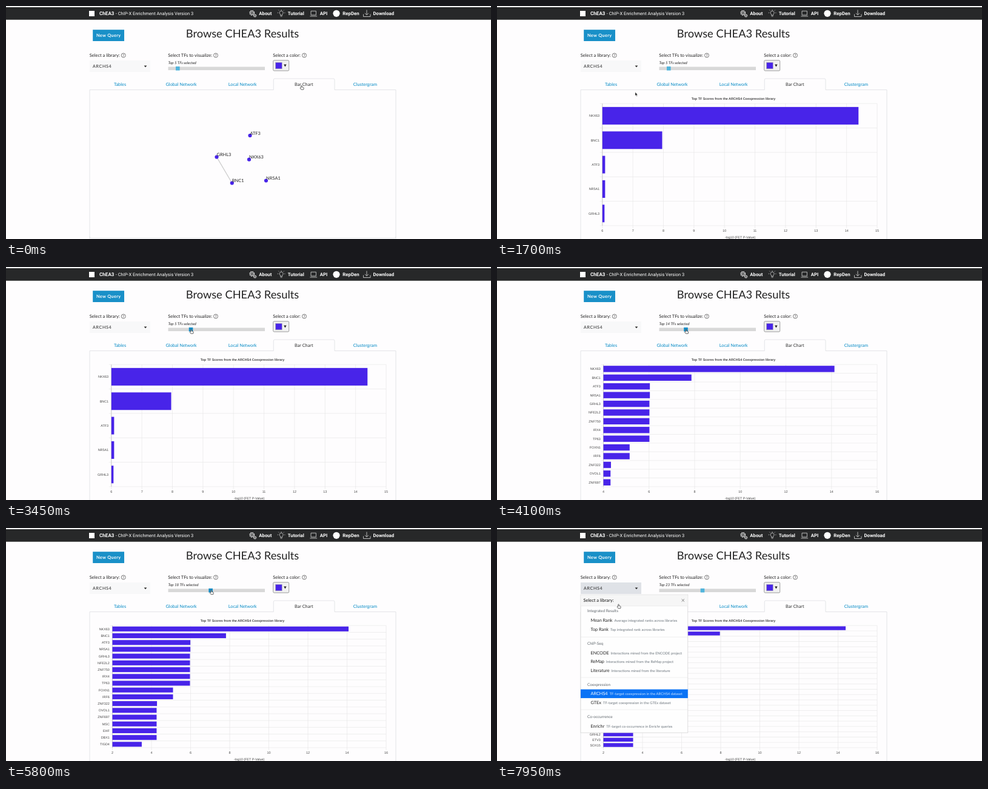
An HTML page for the animation above (8000 ms loop, 800 px wide and 385 px high).

```html
<!DOCTYPE html>
<html lang="en">
<head>
<meta charset="utf-8">
<title>Browse Results</title>
<style>
  html, body { margin: 0; width: 100%; height: 100%; overflow: hidden; background: #fefdfe; }
  svg { display: block; width: 800px; height: 385px; font-family: Lato, sans-serif; fill: #222; text-rendering: geometricPrecision; }
  .nav { font: 7.45px Roboto, sans-serif; fill: #fff; }
  .nav .b { font-weight: 700; font-size: 7.8px; }
  .icon { fill: none; stroke: #ddd; stroke-width: .8; }
  .label { font-size: 7.45px; }
  .tab { font-size: 7.35px; font-weight: 500; text-anchor: middle; fill: #1592c9; }
  .tab.on { font-weight: 400; fill: #333; }
  .chart { font: 5.4px "Liberation Sans", Arial, sans-serif; fill: #444; }
  .grid { stroke: #e5e5e5; stroke-width: .6; fill: none; }
  .bars { fill: #4824e9; }
  .mid { text-anchor: middle; }
  .end { text-anchor: end; }
  .frame { fill: none; stroke: #dedfe2; stroke-width: .8; }
  .group { font-size: 6.45px; fill: #5f666c; }
  .item { font-size: 7.3px; }
  .note { font-size: 5.9px; fill: #6c757d; }
  .chosen, .chosen .note { fill: #fff; }
  .chosen .note { fill: #cfe4ff; }
</style>
</head>
<body>
<svg viewBox="0 0 800 385">
  <rect width="800" height="385" fill="#fefdfe"/>
  <rect y="2" width="800" height="20.7" fill="#272829"/>
  <g class="nav">
    <rect x="137" y="8" width="9" height="9"/>
    <text x="154" y="15" class="b" style="font-size:8.1px">ChEA3</text>
    <text x="180.8" y="15">- ChIP-X Enrichment Analysis Version 3</text>
    <text x="417.3" y="15" class="b">About</text>
    <text x="464.8" y="15" class="b">Tutorial</text>
    <text x="517.7" y="15" class="b">API</text>
    <text x="555.3" y="15" class="b">RepDen</text>
    <text x="605.5" y="15" class="b">Download</text>
    <circle cx="545" cy="12.3" r="5.6"/>
  </g>
  <g class="icon">
    <circle cx="405.8" cy="11.3" r="3.6" stroke-width="1.7" stroke-dasharray="1.7 1.13"/>
    <circle cx="405.8" cy="11.3" r="2.9"/><circle cx="405.8" cy="11.3" r="1.2"/>
    <circle cx="410.6" cy="15.9" r="2.1" stroke-width="1.3" stroke-dasharray="1 .65"/>
    <circle cx="410.6" cy="15.9" r="1.4"/>
    <path d="M452.5 15.3v-1.6a3 3 0 1 1 3.2 0v1.6zM452.6 17h3M454.1 6v1.4M449 11.2h-1.2M459.2 11.2h1.2M450.4 7.6l-.9-.9M457.8 7.6l.9-.9"/>
    <path d="M503 8.3h8.4v6.6H503zM501.4 16.9h11.7"/>
    <path d="M595 6.5v8M592 11.8l3 3 3-3M589.5 13.5v4h11.5v-4"/>
  </g>

  <rect x="143.2" y="39.2" width="51.8" height="18.8" fill="#1990c8"/>
  <text x="169.2" y="51.2" class="mid" style="font-size:7.3px;font-weight:700;letter-spacing:.35px;fill:#fff">New Query</text>
  <text x="390" y="52.3" class="mid" style="font-size:18.3px">Browse CHEA3 Results</text>

  <g class="label">
    <text x="137.8" y="84.3">Select a library:</text>
    <text x="267.3" y="84.3">Select TFs to visualize:</text>
    <text x="440.3" y="84.3">Select a color:</text>
  </g>
  <g id="help"></g>

  <rect id="select" x="138" y="90" width="100" height="19"/>
  <text x="143" y="102.3" style="font-size:7.1px;letter-spacing:.65px">ARCHS4</text>
  <path d="M227.6 98.6h4.8l-2.4 2.6z"/>
  <text id="count" x="267.5" y="96" style="font-size:6.15px;font-style:italic"></text>
  <rect x="267.5" y="100.5" width="159.5" height="5.5" fill="#d8d8d8"/>
  <rect id="handle" x="-3.3" y="99.9" width="6.6" height="6.6"/>
  <rect x="440.7" y="89.8" width="26" height="17.2" rx="1.6" fill="#f1f1f1" stroke="#858585" stroke-width=".8"/>
  <rect x="444.6" y="93.2" width="10.6" height="10.6" fill="#4824e9" stroke="#aaa" stroke-width=".6"/>
  <path d="M458.2 96.4h4.4l-2.2 4.2z"/>

  <path class="frame" d="M138 138.5H441.3V122q0-2 2-2H540q2 0 2 2v16.5H643M138 138.5V390M643 138.5V390"/>
  <g id="tabs"></g>
  <g id="network">
    <path class="frame" d="M138 381q0 2.7 2.7 2.7H640.3q2.7 0 2.7-2.7"/>
    <path d="M347.5 249.5L372.8 292.5" stroke="#ccc" stroke-width="1.3"/>
  </g>
  <g id="charts" class="chart"></g>

  <g id="menu">
    <rect x="138" y="110.2" width="176.8" height="228" fill="#fefefe" stroke="#cfcfcf" stroke-width=".7"/>
    <rect x="138.3" y="110.5" width="176.2" height="18.3" fill="#f6f6f6"/>
    <path d="M138 128.9h176.8" class="grid"/>
    <text x="142.5" y="121.7" class="label" font-weight="500">Select a library:</text>
    <path d="M304.6 117.3l4.4 4.4m0-4.4l-4.4 4.4" stroke="#666" stroke-width=".8"/>
    <path d="M138 180.2h176.8M138 247h176.8M138 300.2h176.8" class="grid"/>
    <rect x="138" y="266.6" width="176.8" height="14.5" fill="#0a73f5"/>
  </g>

  <path id="arrow" d="M0 0v5.8l1.4-1.2 1 2.2 .9-.4-1-2.2h1.7z" fill="#111" stroke="#fff" stroke-width=".35"/>
  <path id="hand" d="M-.7 3.8V.5q.7-1 1.4 0V2.6l2.3.6q.8.3.7 1.2l-.5 2.4H-.6L-2.5 4.3q.4-1 1.8-.5z" fill="#fff" stroke="#222" stroke-width=".7"/>
</svg>
<script>
const LOOP = 8000;
const $ = id => document.getElementById(id);

function add(parent, tag, attrs, text) {
  const el = document.createElementNS('http://www.w3.org/2000/svg', tag);
  for (const key in attrs) el.setAttribute(key, attrs[key]);
  if (text !== undefined) el.textContent = text;
  return parent.appendChild(el);
}

for (const x of [193.7, 346, 492]) {
  add($('help'), 'circle', { cx: x, cy: 81.5, r: 3.5, fill: 'none', stroke: '#444', 'stroke-width': .7 });
  add($('help'), 'text', { x, y: 83.7, class: 'mid', 'font-size': 6 }, '?');
}

['Tables', 'Global Network', 'Local Network', 'Bar Chart', 'Clustergram'].forEach((name, i) =>
  add($('tabs'), 'text', { x: 188 + i * 101.1, y: 131.6, class: i === 3 ? 'tab on' : 'tab' }, name));

const nodes = [['ATF3', 402.5, 214], ['NKX63', 401, 253.7], ['GRHL3', 347.5, 249.5],
  ['BNC1', 372.8, 292.5], ['NR5A1', 429, 288.5]];
for (const [name, cx, cy] of nodes) {
  add($('network'), 'circle', { cx, cy, r: 3.1, fill: '#4824e9' });
  add($('network'), 'text', { x: cx, y: cy - 1.4, 'font-size': 7.4 }, name);
}

// Factors sharing a score are listed together.
const scores = [[14.39, 'NKX63'], [7.96, 'BNC1'], [6.09, 'ATF3 NR5A1'],
  [6.07, 'GRHL3 NFE2L2 ZNF750 IRX4 TP63'], [5.18, 'FOXN1 IRF6'], [4.34, 'ZNF322'],
  [4.32, 'OVOL1 ZNF697 MSC EHF DBX1'], [3.54, 'TIGD4'], [3.52, 'GRHL1 DDIT3 GRHL2 ETV3 SOX15']]
  .flatMap(([score, names]) => names.split(' ').map(name => ({ name, score })));

function buildChart(start, count, min, max, step) {
  const left = count === 5 ? 173.8 : 175.5, right = 627, top = 161.2, bottom = 363;
  const row = (bottom - top) / count;
  const xAt = v => left + (v - min) / (max - min) * (right - left);
  const group = add($('charts'), 'g', {});
  let grid = '';
  for (let v = min; v <= max; v += step) {
    grid += `M${xAt(v)} ${top}V${bottom + 4}`;
    add(group, 'text', { x: xAt(v), y: 372.6, class: 'mid' }, v);
  }
  for (let i = 0; i <= count; i++) grid += `M${left - 4} ${top + i * row}H${right}`;
  add(group, 'path', { class: 'grid', d: grid });
  add(group, 'path', { d: `M${left} ${top}V${bottom}`, stroke: '#bbb', 'stroke-width': .7 });
  const bars = add(group, 'g', { class: 'bars' });
  scores.slice(0, count).forEach(({ name, score }, i) => {
    const mid = top + (i + .5) * row;
    add(group, 'text', { x: left - 4.7, y: mid + 1.9, class: 'end' }, name);
    add(bars, 'rect', { x: left, y: mid - row * .36, width: xAt(score) - left, height: row * .72 });
  });
  add(group, 'text', { x: 390, y: 155.3, class: 'mid', 'font-weight': 700 },
    'Top TF Scores from the ARCHS4 Coexpression library');
  add(group, 'text', { x: 401, y: 383.6, class: 'mid' }, '-log10 (FET P-Value)');
  return { start, count, left, group, bars };
}

const charts = [buildChart(50, 5, 6, 15, 1), buildChart(3800, 14, 4, 16, 2),
  buildChart(5500, 18, 2, 16, 2), buildChart(6100, 23, 2, 16, 2)];

const menu = [
  [139.4, 'Integrated Results'],
  [155.3, 'Mean Rank', 'Average integrated ranks across libraries'],
  [169.8, 'Top Rank', 'Top integrated rank across libraries'],
  [192.6, 'ChIP-Seq'],
  [208.5, 'ENCODE', 'Interactions mined from the ENCODE project'],
  [223, 'ReMap', 'Interactions mined from the ReMap project'],
  [237.6, 'Literature', 'Interactions mined from the literature'],
  [260.5, 'Coexpression'],
  [276.2, 'ARCHS4', 'TF-target coexpression in the ARCHS4 dataset'],
  [290.9, 'GTEx', 'TF-target coexpression in the GTEx dataset'],
  [313.7, 'Co-occurrence'],
  [329.6, 'Enrichr', 'TF-target co-occurrence in Enrichr queries']];
for (const [y, name, note] of menu) {
  const line = add($('menu'), 'text', { x: note ? 154.5 : 149, y, class: note ? 'item' : 'group' }, name);
  if (note) add(line, 'tspan', { dx: 3, class: 'note' }, note);
  if (name === 'ARCHS4') line.classList.add('chosen');
}

// Each key is [time, ...values]; motion between keys is smoothed.
function track(keys, t) {
  const i = keys.findIndex(k => k[0] > t);
  if (i < 0) return keys[keys.length - 1].slice(1);
  if (i === 0) return keys[0].slice(1);
  const a = keys[i - 1], b = keys[i];
  const p = (t - a[0]) / (b[0] - a[0]), e = p * p * (3 - 2 * p);
  return a.slice(1).map((v, j) => v + (b[j + 1] - v) * e);
}

const handleKeys = [[2700, 283.3], [3450, 305], [3750, 311.5], [4250, 311.5], [5000, 323.5],
  [5200, 323.5], [5450, 328], [5900, 339]];
const cursorKeys = [[0, 487.5, 131.3], [1000, 487.5, 131.3], [1650, 228, 142.5], [1850, 228, 142.5],
  [2500, 284, 103.2], [2700, 284, 103.2], [3450, 305.5, 103.2], [3750, 312, 103.2], [4250, 312, 103.2],
  [5000, 324.5, 103.5], [5200, 324.5, 103.5], [5450, 329, 103.2], [5900, 340, 102.8], [6700, 340, 102.8],
  [7300, 201, 100], [7500, 201, 100], [7850, 200.5, 126]];

const show = (el, on) => el.setAttribute('visibility', on ? 'visible' : 'hidden');

function draw(t) {
  const current = charts.filter(c => t >= c.start).pop();
  show($('network'), !current);
  for (const c of charts) show(c.group, c === current);
  if (current) {
    const p = Math.min(1, (t - current.start) / 500), grow = 1 - (1 - p) ** 4;
    current.bars.setAttribute('transform', `translate(${current.left * (1 - grow)} 0) scale(${grow} 1)`);
  }
  $('count').textContent = `Top ${current ? current.count : 5} TFs selected`;

  const dragging = t >= 2450 && t < 6800;
  $('handle').setAttribute('transform', `translate(${track(handleKeys, t)[0]} 0)`);
  $('handle').setAttribute('fill', dragging ? '#168dc6' : '#50b4dc');
  $('select').setAttribute('fill', t >= 7200 ? '#dfe2e7' : '#f8f8f9');
  show($('menu'), t >= 7450);

  const pointing = t < 1100 || (t >= 2400 && t < 6800) || t >= 7150;
  const place = `translate(${track(cursorKeys, t).join(' ')})`;
  for (const id of ['arrow', 'hand']) $(id).setAttribute('transform', place);
  show($('arrow'), !pointing);
  show($('hand'), pointing);
}

const begin = performance.now();
function tick() {
  draw((performance.now() - begin) % LOOP);
  requestAnimationFrame(tick);
}
tick();
</script>
</body>
</html>
```
